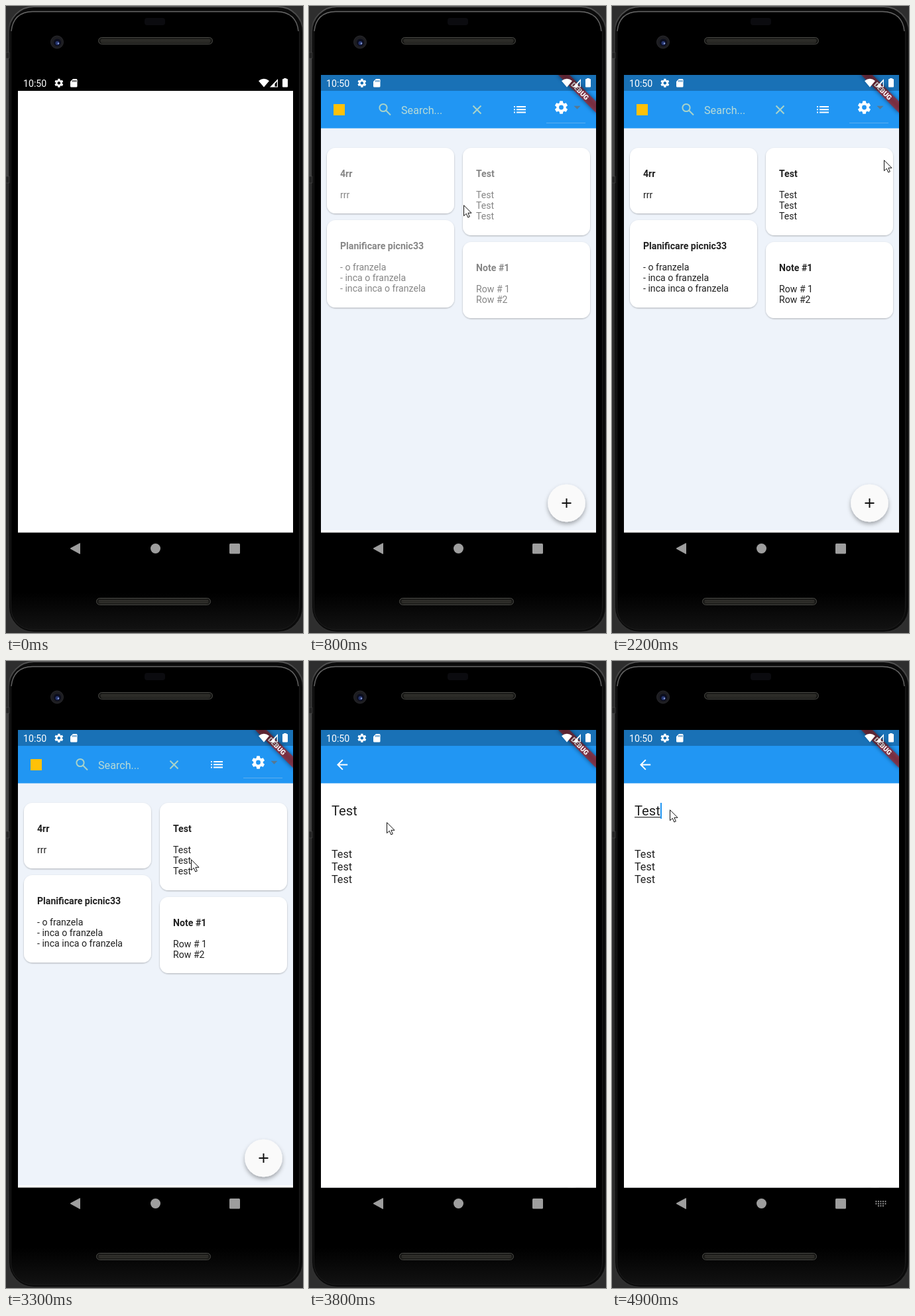
Animation of 448x946 px, one loop 5000 ms. Source, as an HTML page:

```html
<!DOCTYPE html>
<html lang="en">
<head>
<meta charset="utf-8">
<title>Notes app</title>
<style>
html, body { margin: 0; width: 100%; height: 100%; overflow: hidden; background: #000; }
svg { display: block; width: 448px; height: 946px; }
text { font: 14.13px Roboto, sans-serif; fill: #212121; white-space: pre; }
.b { font-weight: 700; }
.m { font-size: 16.15px; }
.l { font-size: 20.2px; }
.w { fill: #fff; }
.hint { fill: #b8dbd6; }
.ghost text { fill: #aab8c8; }
.nav { fill: #9e9e9e; }
</style>
</head>
<body>
<svg viewBox="0 0 448 946">
  <defs>
    <clipPath id="clip"><path d="M18 104h415v690.400H18z"/></clipPath>
    <linearGradient id="rim" x2="0" y2="1">
      <stop stop-color="#555"/><stop offset=".04" stop-color="#333"/>
      <stop offset=".5" stop-color="#1c1c1c"/><stop offset="1" stop-color="#303030"/>
    </linearGradient>
    <linearGradient id="glow" x2="0" y2="1">
      <stop offset=".94" stop-color="#000"/><stop offset="1" stop-color="#121212"/>
    </linearGradient>
    <pattern id="mesh" width="2" height="3" patternUnits="userSpaceOnUse">
      <path d="M0 0h1v1H0zM1 1.5h1v1H1z" fill="#55544c"/>
    </pattern>
    <filter id="low" x="-10%" y="-10%" width="120%" height="130%">
      <feDropShadow dx="0" dy="1" stdDeviation=".8" flood-opacity=".28"/>
    </filter>
    <filter id="high" x="-30%" y="-30%" width="160%" height="170%">
      <feDropShadow dx="0" dy="3.5" stdDeviation="3" flood-opacity=".32"/>
    </filter>
    <filter id="soft" x="-30%" y="-90%" width="160%" height="280%"><feGaussianBlur stdDeviation="3"/></filter>
    <path id="gear" d="M19.14 12.94c.04-.3.06-.61.06-.94s-.02-.64-.07-.94l2.03-1.58a.5.5 0 0 0 .12-.61l-1.92-3.32a.49.49 0 0 0-.59-.22l-2.39.96a7 7 0 0 0-1.62-.94l-.36-2.54a.48.48 0 0 0-.48-.41h-3.84a.47.47 0 0 0-.47.41l-.36 2.54a7.2 7.2 0 0 0-1.62.94l-2.39-.96a.48.48 0 0 0-.59.22L2.74 8.87a.47.47 0 0 0 .12.61l2.03 1.58a6 6 0 0 0-.02 1.88l-2.03 1.58a.5.5 0 0 0-.12.61l1.92 3.32c.12.22.37.29.59.22l2.39-.96c.5.38 1.03.7 1.62.94l.36 2.54c.05.24.24.41.48.41h3.84c.24 0 .44-.17.47-.41l.36-2.54a7 7 0 0 0 1.62-.94l2.39.96c.22.08.47 0 .59-.22l1.92-3.32a.47.47 0 0 0-.12-.61zM12 15.4a3.4 3.4 0 1 1 0-6.8 3.4 3.4 0 0 1 0 6.8z"/>
  </defs>

  <!-- phone body -->
  <path d="M0 0h448v946H0z" fill="#2e2e2e"/>
  <rect x="4" y="1" width="444" height="944" rx="38" fill="#0b0b0b" stroke="url(#rim)" stroke-width="2"/>
  <path d="M0 79h3.500v178H0z" fill="#444"/>
  <path d="M0 70h5v9H0zM0 257h5v10H0z" fill="#252525" stroke="#4a4a4a" stroke-width=".6"/>
  <rect x="7.500" y="8" width="435" height="933" rx="33" fill="url(#glow)" stroke="#1c1c1c"/>
  <path d="M8 38Q11 9 40 8.500H408Q438 9 441 38" fill="none" stroke="#666" stroke-width="1.300"/>
  <rect x="209" y="18" width="31" height="11" rx="4" fill="#0b0b0f"/>
  <circle cx="77" cy="54.500" r="9.500" fill="#1d1d21" stroke="#29292d"/>
  <circle cx="77.500" cy="55" r="5.500" fill="#0b0d1d"/>
  <circle cx="77.500" cy="56" r="3" fill="#26356f"/>
  <circle cx="79" cy="56.500" r="1.200" fill="#8fa2dc"/>
  <g id="slots" stroke="#4a4a46" fill="#171715"></g>

  <g clip-path="url(#clip)">
    <path id="blank" class="w" d="M18 128h415v667H18z"/>
    <g id="app">
      <g id="home">
        <path class="w" d="M18 104h415v691H18z"/>
        <path d="M18 104h415v687H18z" fill="#eef3fa"/>
        <path d="M18 104h415v80.600H18z" fill="#2196f3"/>
        <path d="M37 148h17v17H37z" fill="#ffc107"/>
        <g fill="none" stroke="#a9d3c8" stroke-width="2">
          <circle cx="112" cy="153.500" r="5.600"/><path d="M116 157.500l7 7M247.500 150.500l12 12M259.500 150.500l-12 12"/>
        </g>
        <text class="m hint" x="139" y="163">Search...</text>
        <path class="w" d="M309 151h2v2h-2zM313 151h14v2h-14zM309 155.300h2v2h-2zM313 155.300h14v2h-14zM309 159.600h2v2h-2zM313 159.600h14v2h-14z"/>
        <use href="#gear" class="w" transform="translate(368.400 140.900) scale(1.01)"/>
        <path d="M399.500 150.800h10l-5 5z" fill="#587890"/>
        <path d="M358 176.500h59" stroke="#5caeef"/>
        <g id="cards"></g>
        <g id="notes"></g>
        <circle cx="388.500" cy="750" r="28.300" fill="#fafafa" filter="url(#high)"/>
        <path d="M381.500 750h14M388.500 743v14" stroke="#111" stroke-width="2"/>
      </g>
      <path id="scrim" d="M18 104h415v691H18z"/>
      <g id="page">
        <path class="w" d="M18 104h415v691H18z"/>
        <path d="M18 104h415v80.600H18z" fill="#2196f3"/>
        <path class="w" d="M20 11H7.830l5.590-5.590L12 4l-8 8 8 8 1.410-1.410L7.830 13H20z" transform="translate(38 144.400) scale(1.01)"/>
        <g class="ghost" id="ghost"><text class="l" x="34" y="233">Title...</text><text class="m" x="34" y="297">Note...</text></g>
        <text class="l" x="34" y="233">Test</text>
        <text class="m" x="34" y="297">Test</text><text class="m" x="34" y="316">Test</text><text class="m" x="34" y="335">Test</text>
        <path id="line" d="M34 235.700h39.500" stroke="#333" stroke-width="1.200"/>
        <path id="caret" d="M74 214v24" stroke="#2196f3" stroke-width="2"/>
      </g>
      <g transform="translate(433 104) rotate(45) scale(1.01)">
        <path d="M-40 28h80v12h-80z" opacity=".5" filter="url(#soft)"/>
        <path d="M-40 28h80v12h-80z" fill="#b71c1c" opacity=".63"/>
        <text class="w" y="37.700" text-anchor="middle" style="font-size:10.200px;font-weight:900">DEBUG</text>
      </g>
      <path d="M18 104h415v24H18z" opacity=".25"/>
    </g>
    <!-- status bar -->
    <text class="w" x="26" y="122">10:50</text>
    <g class="w">
      <use href="#gear" transform="translate(71.700 108.100) scale(.68)"/>
      <path fill-rule="evenodd" d="M101 110h5q1.500 0 1.500 1.500v9.500q0 1.500-1.500 1.500h-7.500q-1.500 0-1.500-1.500v-7zM100.300 112v2.600h1.200V112zM102.600 112v2.600h1.200V112zM104.900 112v2.600h1.200V112z"/>
      <path d="M381 113q8-6.500 16 0l-8 9.500z"/>
      <path fill-rule="evenodd" d="M398 122.500L410 110v12.500zM405.500 117.500v4h3.300v-7.700z"/>
      <path d="M419 110v-1h4v1h1q1 0 1 1v10.500q0 1-1 1h-6q-1 0-1-1V111q0-1 1-1z"/>
    </g>
  </g>

  <!-- navigation -->
  <path class="nav" d="M97 818.500L111.500 810.700v15.800z" stroke="#9e9e9e" stroke-linejoin="round"/>
  <circle class="nav" cx="225.500" cy="818.500" r="7.500"/>
  <rect class="nav" x="337" y="811" width="16" height="15.500" rx="1.500"/>
  <path id="keys" d="M397.500 815.500h16M397.500 818.800h16M401 822.200h9" stroke="#9e9e9e" stroke-width="1.800" stroke-dasharray="1.900 1.600" fill="none"/>

  <g id="cursor">
    <g id="busy"><circle cx="14" cy=".5" r="5.700" fill="#fff" stroke="#2196f3" stroke-width="3.600"/></g>
    <path d="M.5.700V16.700L4.300 13.300 6.800 19 9.300 17.900 6.900 12.300H12z" fill="#fff" stroke="#111"/>
  </g>
</svg>
<script>
const $ = id => document.getElementById(id);

for (const [x, y] of [[139.5, 47.5], [136.5, 893.5]])
  $('slots').innerHTML += `<rect x="${x}" y="${y}" width="172" height="10" rx="5"/>
    <rect x="${x + 3}" y="${y + 2}" width="166" height="6" rx="3" fill="url(#mesh)" stroke="none"/>`;

// x, y, height, title, lines
const notes = [
  [27, 214, 99, '4rr', ['rrr']],
  [27, 323, 132, 'Planificare picnic33', ['- o franzela', '- inca o franzela', '- inca inca o franzela']],
  [232, 214, 132, 'Test', ['Test', 'Test', 'Test']],
  [232, 356, 115, 'Note #1', ['Row # 1', 'Row #2']]
];
for (const [x, y, h, title, lines] of notes) {
  $('cards').innerHTML += `<rect class="w" x="${x}" y="${y}" width="192" height="${h}" rx="13" filter="url(#low)"/>`;
  $('notes').innerHTML += `<text class="b" x="${x + 20}" y="${y + 44}">${title}</text>` +
    lines.map((s, i) => `<text x="${x + 20}" y="${y + 76 + i * 16.2}">${s}</text>`).join('');
}

// pointer path: time, x, y
const path = [
  [800, 233, 300], [1100, 310, 520], [1400, 390, 745], [1500, 424, 765], [1900, 258, 146],
  [2100, 380, 170], [2200, 410, 232], [2500, 365, 832], [2600, 360, 820], [3000, 268, 269],
  [3300, 279, 299], [3500, 279, 299], [3800, 117, 243], [4000, 94, 231], [4400, 87, 224], [5000, 87, 224]
];

function pointAt(t) {
  const i = Math.max(1, path.findIndex(p => p[0] > t));
  const [t0, x0, y0] = path[i - 1], [t1, x1, y1] = path[i];
  const k = (t - t0) / (t1 - t0);
  return [x0 + (x1 - x0) * k, y0 + (y1 - y0) * k].map(Math.round);
}

const show = (id, on) => { $(id).style.display = on ? '' : 'none'; };
const zoom = (id, s) => $(id).setAttribute('transform', `translate(225.5 449.5) scale(${s}) translate(-225.5 -449.5)`);

function draw(t) {
  const opening = t >= 3500;
  show('blank', t < 800);
  show('app', t >= 800);
  $('notes').style.opacity = Math.min(1, .54 + (t - 800) / 400);

  // the page zooms in while the list grows behind a darkening scrim
  const left = opening ? Math.pow(.16, (t - 3500) / 100) : 1;
  zoom('page', t >= 3700 ? 1 : 1 - .048 * left);
  zoom('home', opening ? 1.05 - .016 * left : 1);
  $('scrim').style.opacity = opening ? Math.min(.6, .2 + (t - 3500) / 250) : 0;
  show('page', opening);
  $('ghost').style.opacity = t < 3600 ? .4 : 0;

  show('line', t >= 4800);
  show('caret', t >= 4700);
  show('keys', t >= 4700);

  show('cursor', t >= 800 && (t < 3100 || t >= 3300));
  show('busy', opening && t < 3700);
  if (t >= 800) $('cursor').setAttribute('transform', `translate(${pointAt(t)})`);
}

function tick() {
  draw(Math.floor(performance.now() % 5000 / 100) * 100);
  requestAnimationFrame(tick);
}
tick();
</script>
</body>
</html>
```
